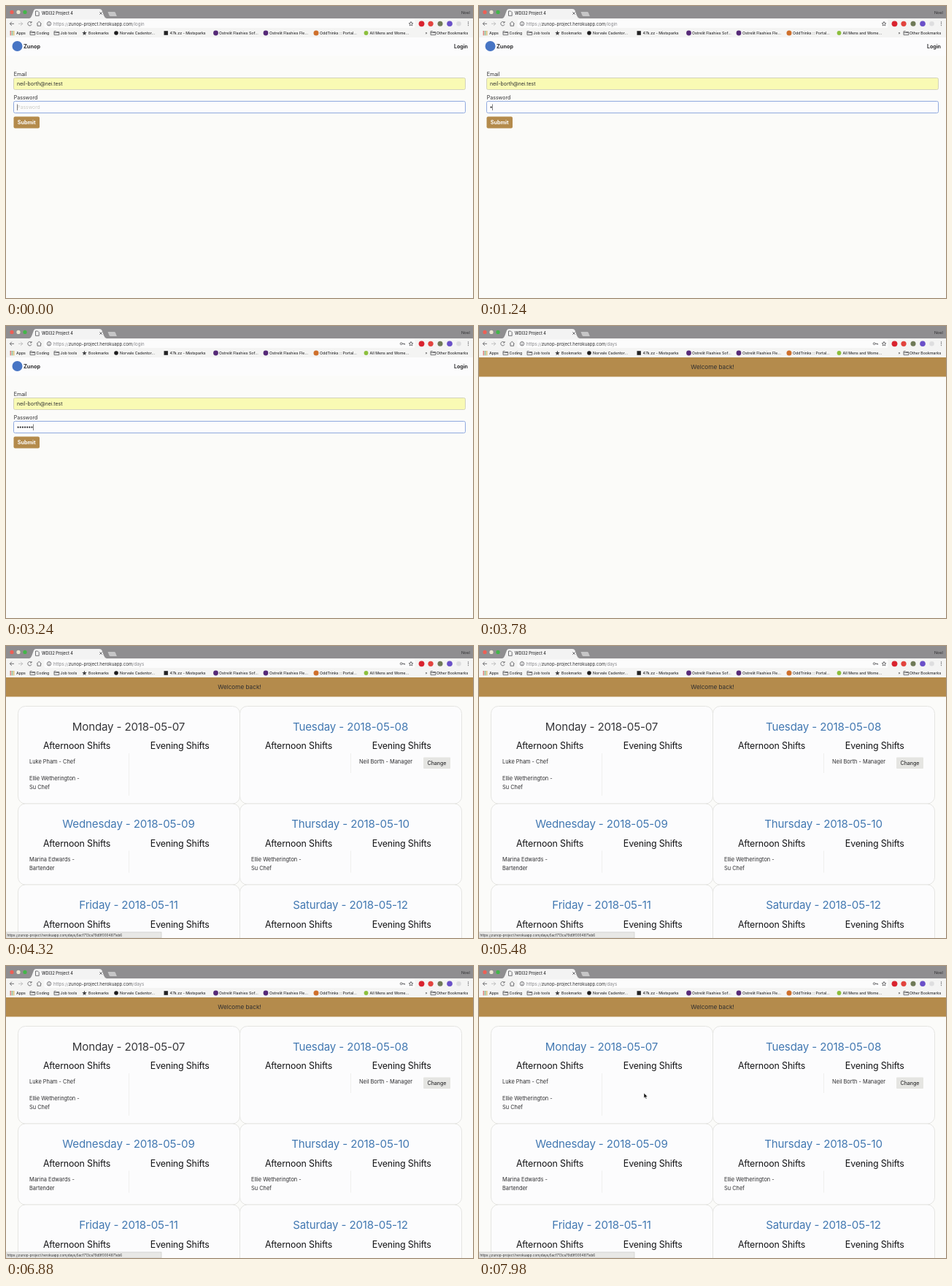
An HTML page for the animation above (8000 ms loop, 640x400 px).

```html
<!DOCTYPE html>
<html lang="en">
<head>
<meta charset="utf-8">
<title>Shift planner login</title>
<style>
  html, body { margin: 0; width: 100%; height: 100%; overflow: hidden; background: #fbfbf9; }
  svg { display: block; width: 100vw; height: 100vh; }
  text { font-family: Inter, Roboto, sans-serif; fill: #2e2e30; white-space: pre; }
  .bold { font-weight: 700; }
  .medium { font-weight: 500; }
  .day { font-size: 15.1px; letter-spacing: -.15px; fill: #4379b2; }
  .shift { font-size: 12.4px; letter-spacing: -.15px; fill: #141416; }
  .line { fill: none; stroke: #626266; stroke-width: .9; }
  .soft { fill: #848488; }
</style>
</head>
<body>
<svg id="stage" viewBox="0 0 640 400" preserveAspectRatio="none"></svg>
<script>
const NS = 'http://www.w3.org/2000/svg';
const LOOP = 8000;
const SITE = 'zunop-project.herokuapp.com';
const stage = document.getElementById('stage');

function add(parent, tag, attrs = {}, content) {
  const el = document.createElementNS(NS, tag);
  for (const key in attrs) el.setAttribute(key, attrs[key]);
  if (content !== undefined) el.textContent = content;
  parent.appendChild(el);
  return el;
}
const group = parent => add(parent, 'g');
const rect = (parent, x, y, width, height, fill, more = {}) =>
  add(parent, 'rect', { x, y, width, height, fill, ...more });
const dot = (parent, cx, cy, r, fill) => add(parent, 'circle', { cx, cy, r, fill });
const path = (parent, d, more) => add(parent, 'path', { d, ...more });
const label = (parent, x, y, size, content, more = {}) =>
  add(parent, 'text', { x, y, 'font-size': size, ...more }, content);
const centred = (parent, x, y, content, kind) =>
  add(parent, 'text', { x, y, class: kind, 'text-anchor': 'middle' }, content);
const show = (el, on) => el.setAttribute('visibility', on ? 'inherit' : 'hidden');

function star(parent, x, y, r, more) {
  const points = Array.from({ length: 10 }, (_, i) => {
    const a = i * Math.PI / 5 - Math.PI / 2, d = i % 2 ? r * .45 : r;
    return `${x + d * Math.cos(a)},${y + d * Math.sin(a)}`;
  });
  add(parent, 'polygon', { points: points.join(' '), ...more });
}

function buildChrome() {
  const g = group(stage);
  rect(g, 0, 0, 640, 17, '#8f8e90');
  ['#ee5f56', '#ece6d2', '#43b649'].forEach((c, i) => dot(g, 8 + i * 9, 8.4, 2.6, c));
  path(g, 'M32 17 Q34.5 16 35.5 13 L38 6 Q39 4 41 4 H128 Q130.5 4 131.5 6 L134 13 Q135 16 138 17Z', { fill: '#f3f3f3' });
  path(g, 'M40.5 7 h3 l1.7 1.7 v4.6 h-4.7z', { class: 'line', 'stroke-width': .6 });
  label(g, 49, 12.2, 5.5, 'WDI32 Project 4', { class: 'medium' });
  path(g, 'M128.3 8.3 l3.4 3.4 m0 -3.4 l-3.4 3.4', { class: 'line' });
  path(g, 'M139.5 8 h9 q1 0 1.4 1 l2 5 h-9 q-1 0 -1.4 -1z', { fill: '#c6c6c7' });
  label(g, 624, 11, 5.4, 'Noel');

  rect(g, 0, 17, 640, 26, '#f4f4f3');
  rect(g, 52.5, 18.5, 508, 11.5, '#fcfcfc', { rx: 2 });
  path(g, 'M11 24.3 H5.4 m2.5 -2.6 l-2.6 2.6 l2.6 2.6', { class: 'line' });
  path(g, 'M17 24.3 h5.6 m-2.5 -2.6 l2.6 2.6 l-2.6 2.6', { class: 'line', opacity: .4 });
  path(g, 'M34.6 22.5 A2.7 2.7 0 1 0 35 25.3 M35 21 v2 h-2', { class: 'line' });
  path(g, 'M42 24.3 l3.3 -3 l3.3 3 M43 24 v3.2 h4.6 v-3.2', { class: 'line', 'stroke-width': .8 });
  add(g, 'circle', { cx: 59, cy: 24.3, r: 2.7, class: 'line', 'stroke-width': .7 });
  path(g, 'M59 22.5 v.7 M59 23.9 v2', { class: 'line', 'stroke-width': .7 });

  const url = label(g, 65, 26.5, 6.1, '');
  add(url, 'tspan', { class: 'soft' }, 'https://');
  add(url, 'tspan', {}, SITE);
  const route = add(url, 'tspan', { class: 'soft' }, '/login');

  const key = group(g);
  add(key, 'circle', { cx: 541.6, cy: 24.2, r: 1.4, class: 'line' });
  path(key, 'M543 24.2 h3.5 v1.5 m-1.5 -1.5 v1.2', { class: 'line' });
  star(g, 555, 24.5, 3.1, { class: 'line', 'stroke-width': .7 });
  [[569.5, 3.9, '#d9232f'], [582, 3.6, '#e2433d'], [595, 3.5, '#6f7a58'],
   [608, 3.8, '#6a50c8'], [620.5, 3.3, '#dededf']].forEach(([x, r, c]) => dot(g, x, 24.3, r, c));
  [22, 24.3, 26.6].forEach(y => dot(g, 633.5, y, .7, '#626266'));

  const folder = x => path(g, `M${x} 34.7 h2.5 l.8 .9 h3.5 v4 h-6.8z M${x} 36.6 h6.8`, { class: 'line', 'stroke-width': .7 });
  for (let i = 0; i < 9; i++)
    rect(g, 5.5 + i % 3 * 2.2, 34.2 + Math.floor(i / 3) * 2.2, 1.5, 1.5, ['#d4564c', '#5b9a5e', '#d0a73c'][i % 3]);
  [33, 66, 582].forEach(folder);
  star(g, 107.5, 37.2, 3.4, { fill: '#454548' });
  [[151, 2.8, '#1c1c1e'], [287.5, 3.4, '#562a78'], [356, 3.4, '#562a78'],
   [425, 3.5, '#cf702c'], [493.5, 2.9, '#8cbf3d']].forEach(([x, r, c]) => dot(g, x, 37, r, c));
  rect(g, 216.5, 34.2, 5.4, 5.6, '#222224');
  [[14, 'Apps'], [41.5, 'Coding'], [74.5, 'Job tools'], [113, 'Bookmarks'],
   [156, 'Norvale Cadentor...'], [224.5, '47k.zz - Mistsparks'],
   [292, 'Ostrelit Flashies Sof...'], [361, 'Ostrelit Flashies Fle...'],
   [430, 'OddTrinks :: Portal...'], [498.5, 'All Mens and Wome...'],
   [590, 'Other Bookmarks']].forEach(([x, name]) => label(g, x, 39, 5.2, name, { class: 'medium' }));
  label(g, 574.5, 38.7, 5, '»');
  return { route, key };
}

function buildLogin() {
  const g = group(stage);
  rect(g, 0, 43, 640, 25, '#fcfcfd');
  dot(g, 15.5, 55, 7, '#4775c4');
  label(g, 24, 57.7, 7.3, 'Zunop', { class: 'bold' });
  label(g, 614, 57.5, 7, 'Login', { class: 'bold' });
  label(g, 10.8, 95.6, 7, 'Email');
  rect(g, 10.5, 98.5, 619, 16, '#f9fab4', { rx: 2, stroke: '#d3d3bc' });
  label(g, 15, 108.9, 6.9, 'neil-borth@nei.test');
  label(g, 10.8, 127.7, 7, 'Password');
  rect(g, 10.5, 130.5, 619, 16, '#fcfcfd', { rx: 2, stroke: '#8fa9df' });
  const hint = label(g, 15.3, 140.9, 6.8, 'Password', { style: 'fill:#cbcbc6' });
  const dots = Array.from({ length: 7 }, (_, i) => dot(g, 16.6 + i * 3.15, 138.7, 1.1, '#2e2e30'));
  const caret = rect(g, 15, 134.5, .7, 8.5, '#4c4c50');
  rect(g, 10.5, 151.5, 35.5, 16, '#b48b4c', { rx: 2 });
  label(g, 28.2, 162.2, 7.2, 'Submit', { class: 'bold', 'text-anchor': 'middle', style: 'fill:#fcfcfc' });
  return { g, hint, dots, caret };
}

function buildWelcome() {
  const g = group(stage);
  rect(g, 0, 43, 640, 26.5, '#b48b4c');
  label(g, 320, 59, 8.2, 'Welcome back!', { 'text-anchor': 'middle' });
  return g;
}

function buildDays() {
  const g = group(stage);
  const tops = [82.5, 216, 327, 461];
  const days = ['Monday - 2018-05-07', 'Tuesday - 2018-05-08', 'Wednesday - 2018-05-09',
    'Thursday - 2018-05-10', 'Friday - 2018-05-11', 'Saturday - 2018-05-12'];
  const titles = days.map((name, i) => {
    const row = Math.floor(i / 2), x = 16.5 + i % 2 * 304, y = tops[row];
    rect(g, x, y, 304, tops[row + 1] - y, '#fcfcfd', { rx: 10, stroke: '#e3e3df', 'stroke-width': .9 });
    const dividerHeight = [58, 27, 30, 30, 0, 0][i];
    if (dividerHeight) rect(g, x + 151.5, y + 64.5, .8, dividerHeight, '#ececea');
    centred(g, x + 80.5, y + 58.5, 'Afternoon Shifts', 'shift');
    centred(g, x + 221.8, y + 58.5, 'Evening Shifts', 'shift');
    return centred(g, x + 151.5, y + 33, name, 'day');
  });
  [[32, 161, 'Luke Pham - Chef'], [32, 184, 'Ellie Wetherington -'], [32, 196, 'Su Chef'],
   [484, 161, 'Neil Borth - Manager'], [32, 295, 'Marina Edwards -'], [32, 307, 'Bartender'],
   [336, 295, 'Ellie Wetherington -'], [336, 307, 'Su Chef']]
    .forEach(([x, y, line]) => label(g, x, y, 7.4, line));
  rect(g, 572, 152.5, 37, 15.5, '#e5e5e2', { rx: 1 });
  label(g, 590.5, 162.8, 7, 'Change', { class: 'medium', 'text-anchor': 'middle' });
  return { g, monday: titles[0] };
}

function buildStatus() {
  const g = group(stage);
  rect(g, 0, 392, 213, 8, '#e8e8e6', { stroke: '#c3c3c1', 'stroke-width': .6 });
  label(g, 1.5, 398, 4.6, `https://${SITE}/days/5acf713ca79d9f0004871eb6`);
  return g;
}

const chrome = buildChrome();
const login = buildLogin();
const welcome = buildWelcome();
const days = buildDays();
const status = buildStatus();
const pointer = path(stage, 'M0 0 V7 L1.6 5.5 L2.7 8 L3.9 7.5 L2.8 5.1 H5Z',
  { fill: '#111', stroke: '#fff', 'stroke-width': .5 });

const keyTimes = [1200, 1360, 1500, 1680, 1820, 1960, 2100];
const at = { key: 1700, welcome: 3420, days: 3980, hover: 4180, move: 7560, rest: 7900 };

function render(t) {
  const typed = keyTimes.filter(k => k <= t).length;
  const lastKey = typed ? keyTimes[typed - 1] : 0;
  const signedIn = t >= at.welcome;
  chrome.route.textContent = signedIn ? '/days' : '/login';
  show(chrome.key, t >= at.key);
  show(login.g, !signedIn);
  show(welcome, signedIn);
  show(days.g, t >= at.days);
  show(status, t >= at.hover);

  login.dots.forEach((d, i) => show(d, i < typed));
  show(login.hint, !typed);
  show(login.caret, Math.floor((t - lastKey) / 500) % 2 === 0);
  login.caret.setAttribute('x', 15 + typed * 3.15);

  const p = Math.min(1, Math.max(0, (t - at.move) / (at.rest - at.move)));
  const eased = 1 - (1 - p) ** 2;
  const y = 112 + 62 * eased;
  show(pointer, t >= at.move);
  pointer.setAttribute('transform', `translate(${150 + 76 * eased} ${y})`);
  days.monday.style.fill = t >= at.hover && y < 120 ? '#37373a' : '';
}

const start = performance.now();
function tick() {
  render((performance.now() - start) % LOOP);
  requestAnimationFrame(tick);
}
tick();
</script>
</body>
</html>
```
